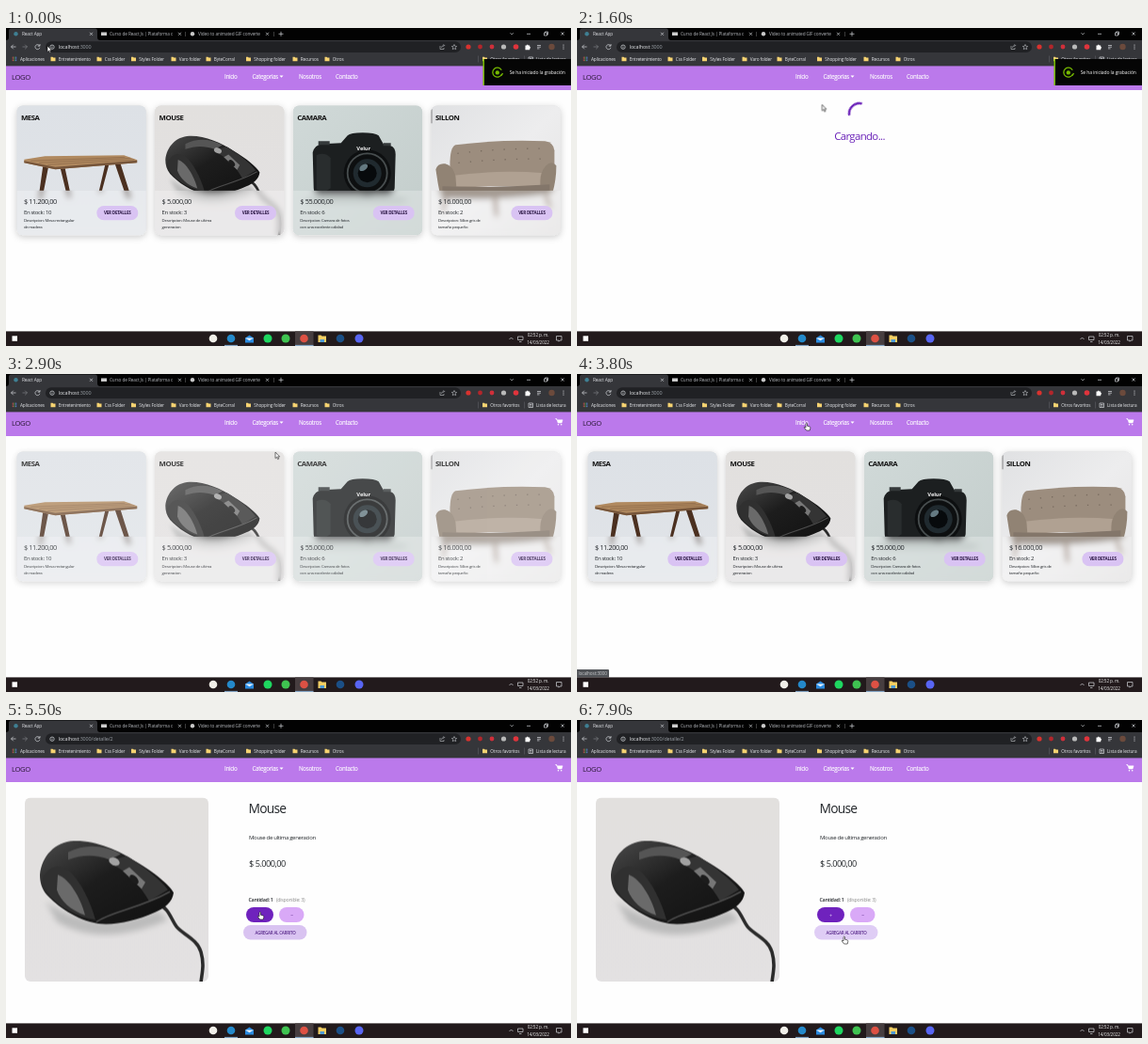
An HTML page that plays this animation: 600x338 px, repeating every 8 s.

```html
<!DOCTYPE html>
<html lang="es">
<head>
<meta charset="utf-8">
<title>Tienda</title>
<style>
html, body { margin: 0; width: 100%; height: 100%; overflow: hidden; background: #fff; }
svg { display: block; }
#stage { width: 100vw; height: 100vh; }
text { font-family: "Open Sans", "Noto Sans", sans-serif; letter-spacing: -.02em; white-space: pre; }
.page text { letter-spacing: -.055em; }
.mid { text-anchor: middle; }
.semi { font-weight: 600; }
.bold { font-weight: 700; }
.line { fill: none; stroke: #d5d7db; stroke-width: .7; }

/* One loop is 8 s, so 1% is 80 ms. */
.k { animation: 8s step-end infinite; }
#cards { animation-name: cards; }
#loading { animation-name: loading; }
#detail, #path { animation-name: detail; }
#photo { animation-name: photo; }
#spin { animation: spin 8s linear infinite; }
#notice { animation-name: notice; }
#cursor { animation: move 8s ease-in-out infinite; }
#arrow { animation-name: arrow; }
#hand { animation-name: hand; }
#beam { animation-name: beam; }
#home { animation-name: home; }
#link { animation-name: link; }
#one { animation-name: one; }
#two { animation-name: two; }
#three { animation-name: three; }
#minus { animation-name: minus; }
#add { animation-name: add; }

@keyframes cards {
  0% { opacity: 1; }
  2.5% { opacity: 0; }
  31.2% { opacity: .25; animation-timing-function: linear; }
  38% { opacity: 1; }
  58.7%, 100% { opacity: 0; }
}
@keyframes loading { 0% { opacity: 0; } 2.5% { opacity: 1; } 31.2%, 100% { opacity: 0; } }
@keyframes detail { 0% { opacity: 0; } 58.7%, 100% { opacity: 1; } }
@keyframes photo {
  0%, 58.7% { opacity: .4; animation-timing-function: linear; }
  67%, 100% { opacity: 1; }
}
@keyframes spin { to { transform: rotate(3840deg); } }
@keyframes notice {
  0% { transform: none; }
  24% { transform: none; animation-timing-function: ease-in; }
  27.5%, 100% { transform: translateX(100px); }
}
@keyframes move {
  0%, 1.2% { transform: translate(44px, 19px); }
  7.5%, 12% { transform: translate(79px, 45px); }
  23% { transform: translate(293px, 88px); }
  28.75%, 34% { transform: translate(297px, 91px); }
  41.25%, 47.5% { transform: translate(243px, 52px); }
  55% { transform: translate(265px, 194px); }
  58.75% { transform: translate(268px, 186px); }
  64%, 75.5% { transform: translate(269px, 204px); }
  80.5%, 91.25% { transform: translate(308px, 203px); }
  93.75%, 95.5% { transform: translate(288px, 223px); }
  98.75%, 100% { transform: translate(283px, 230px); }
}
@keyframes arrow {
  0% { opacity: 1; }
  40.5% { opacity: 0; }
  49% { opacity: 1; }
  53.7% { opacity: 0; }
  92.5% { opacity: 1; }
  95%, 100% { opacity: 0; }
}
@keyframes hand {
  0% { opacity: 0; }
  40.5% { opacity: 1; }
  49% { opacity: 0; }
  53.7% { opacity: 1; }
  58.7% { opacity: 0; }
  61% { opacity: 1; }
  92.5% { opacity: 0; }
  95%, 100% { opacity: 1; }
}
@keyframes beam { 0% { opacity: 0; } 58.7% { opacity: 1; } 61%, 100% { opacity: 0; } }
@keyframes home { 0% { opacity: 0; } 47.4% { opacity: 1; } 51%, 100% { opacity: 0; } }
@keyframes link { 0% { opacity: 0; } 55% { opacity: 1; } 62%, 100% { opacity: 0; } }
@keyframes one { 0% { opacity: 1; } 71% { opacity: 0; } 90.5%, 100% { opacity: 1; } }
@keyframes two { 0% { opacity: 0; } 71% { opacity: 1; } 75% { opacity: 0; } 86% { opacity: 1; } 90.5%, 100% { opacity: 0; } }
@keyframes three { 0% { opacity: 0; } 75% { opacity: 1; } 86%, 100% { opacity: 0; } }
@keyframes minus { 0% { fill: #d9a9f7; } 79% { fill: #dcb6f8; } 92.5%, 100% { fill: #d9a9f7; } }
@keyframes add { 0% { fill: #d9c3f1; } 96%, 100% { fill: #dfcdf5; } }
</style>
</head>
<body>
<svg id="stage" viewBox="0 0 600 338" preserveAspectRatio="none">
  <defs>
    <linearGradient id="grey" x2="0" y2="1"><stop stop-color="#e2e0de"/><stop offset="1" stop-color="#e3e1e2"/></linearGradient>
    <linearGradient id="pale" x2="0" y2="1"><stop stop-color="#dde1e6"/><stop offset="1" stop-color="#e1e4e8"/></linearGradient>
    <linearGradient id="mist" x2="1" y2="1"><stop stop-color="#d0d9d8"/><stop offset="1" stop-color="#c3cdcb"/></linearGradient>
    <linearGradient id="wall" x2="1" y2="1"><stop stop-color="#e0e1e3"/><stop offset=".5" stop-color="#ededee"/><stop offset="1" stop-color="#e3e2e2"/></linearGradient>
    <linearGradient id="gloss" x2="1" y2="1"><stop stop-color="#4a4a4a"/><stop offset=".45" stop-color="#1d1d1d"/><stop offset="1" stop-color="#111"/></linearGradient>
    <filter id="blur"><feGaussianBlur stdDeviation="3"/></filter>
    <filter id="soft" x="-20%" y="-20%" width="140%" height="140%"><feDropShadow dx="0" dy="2" stdDeviation="3.500" flood-opacity=".2"/></filter>
    <clipPath id="round"><rect width="137.5" height="138" rx="7"/></clipPath>
    <clipPath id="glass"><rect y="90.5" width="137.5" height="48"/></clipPath>
    <clipPath id="frame"><rect width="195" height="195.5" rx="6"/></clipPath>

    <g id="table">
      <rect width="138" height="138" fill="url(#pale)"/>
      <path d="M28 64h6l-7 36h-4zM46 65h5l7 33h-4zM104 61h6l12 38h-5zM94 63h4l-8 30h-3z" fill="#4b3020"/>
      <path d="M8 57.500l22-3.500 84-1 14 5-1 3-86 7-33-7z" fill="#b0895f"/>
      <path d="M15 59l100-4M24 61l97-5M33 63l92-5.500" stroke="#8b6748" stroke-width=".7" fill="none"/>
      <path d="M8 59l33 6.500 87-7v2.500l-87 7-33-7z" fill="#76553a"/>
    </g>

    <g id="mouse">
      <rect width="196" height="196" fill="url(#grey)"/>
      <path d="M22 110q50 36 120 10l10 10q-70 30-118 2z" fill="#bbb" filter="url(#blur)"/>
      <path d="M141 113c12 4 14 16 20 24s22 13 26 27 1 22 0 33" fill="none" stroke="#2b2b2b" stroke-width="3.600"/>
      <path d="M16 82C18 62 32 47 52 46C74 45 100 56 118 68C138 80 154 93 158 101C157 111 148 118 138 122C118 131 96 136 78 134C54 130 34 115 23 103C18 97 16 90 16 82Z" fill="url(#gloss)"/>
      <path d="M19 86c7-14 18-16 28-8s22 30 28 52c-20-3-38-14-48-25q-7-9-8-19z" fill="#303030"/>
      <path d="M35 82c12 4 24 24 29 43-15-5-26-15-30-27z" fill="#6a6a6a"/>
      <path d="M46 58c18-9 38-8 56 2l-12 6c-16-6-30-5-44 0z" fill="#555"/>
      <path d="M88 68l20-6c19 12 36 25 44 36l-20 12c-10-18-24-32-44-42z" fill="#343434"/>
      <path d="M104 78l7-4 17 16-4 7z" fill="#777"/>
      <ellipse cx="95" cy="68" rx="6" ry="4" transform="rotate(25 95 68)" fill="#a2a2a2"/>
      <ellipse cx="116" cy="87" rx="6" ry="3.500" transform="rotate(48 116 87)" fill="#1c1c1c"/>
      <path d="M76 132c18-12 46-14 78-32" fill="none" stroke="#4d4d4d" stroke-width="1.500"/>
    </g>

    <g id="camera">
      <rect width="138" height="138" fill="url(#mist)"/>
      <path d="M16 98h104v6H16z" fill="#a6b0ae" filter="url(#blur)"/>
      <path d="M21 50q2-8 10-9l20-1 7-8q3-3 16-3t17 3l5 9 8 2q5 2 5 9l-1 36q-1 8-9 8H30q-8 0-8-8z" fill="#1c1f20"/>
      <path d="M27 38h12v4H27zM96 40h8v3h-8z" fill="#34393a"/>
      <path d="M25 53q9-4 15 3v32q-7 6-15 1z" fill="#292d2e"/>
      <circle cx="79" cy="72" r="25" fill="#0d0f10"/>
      <circle cx="79" cy="72" r="21" fill="none" stroke="#474d4e" stroke-width="1.800"/>
      <circle cx="79" cy="72" r="15" fill="#202a2f"/>
      <circle cx="79" cy="72" r="10" fill="#070a0c"/>
      <ellipse cx="75" cy="66" rx="5" ry="3" transform="rotate(-35 75 66)" fill="#647981"/>
      <text x="75" y="47.800" class="mid bold" font-size="5.800" fill="#eee">Velur</text>
    </g>

    <g id="sofa">
      <rect width="138" height="138" fill="url(#wall)"/>
      <rect y="4" width="1" height="15" fill="#666"/>
      <path d="M13 98h4l-3 16h-2zM66 100h4l1 18h-3zM120 96h4l4 14h-2z" fill="#7a5638"/>
      <path d="M20 64q0-20 6-22 46-6 95-4 9 1 10 10v34l-108 6z" fill="#9c8d7e"/>
      <path d="M28 51q50-6 98-5M29 61q50-5 98-4" stroke="#776a5e" stroke-width="1.300" stroke-dasharray="1.300 11" fill="none"/>
      <path d="M20 75q48-7 100-3l6 14H18z" fill="#b0a192"/>
      <path d="M5 68q2-7 10-6 8 2 11 13l1 14-17 8q-3-14-5-29zM133 64q-5-6-11 0-6 7-6 16v13h13q4-14 4-29z" fill="#918374"/>
      <path d="M12 86q54 2 114-2v10q-58 8-114 5z" fill="#83766a"/>
    </g>

    <g id="folder"><path d="M0 .5h2l.8.8H5V5H0z" fill="#f5d271"/></g>
    <path id="close" d="M-1.500-1.500l3 3m0-3l-3 3"/>
  </defs>

  <rect width="600" height="338" fill="#fefefe"/>

  <g class="page">
    <g id="cards" class="k"></g>

    <g id="loading" class="k" fill="#6a21b8">
      <g transform="translate(300 91)"><path id="spin" d="M-6.600 8.800A11 11 0 0 1-6.900-8.500" fill="none" stroke="#6a21b8" stroke-width="2.400" stroke-linecap="round"/></g>
      <text x="300" y="119.300" class="mid" font-size="11.400">Cargando...</text>
    </g>

    <g id="detail" class="k" fill="#212529">
      <g id="photo" class="k"><g transform="translate(20 82.500)" clip-path="url(#frame)"><use href="#mouse"/></g></g>
      <text x="257.500" y="99" font-size="13.800">Mouse</text>
      <text x="258" y="127" font-size="6">Mouse de ultima generacion</text>
      <text x="258" y="156" font-size="9.200">$ 5.000,00</text>
      <g class="semi" font-size="5.400">
        <text id="one" class="k" x="257.500" y="193.300">Cantidad: 1</text>
        <text id="two" class="k" x="257.500" y="193.300">Cantidad: 2</text>
        <text id="three" class="k" x="257.500" y="193.300">Cantidad: 3</text>
      </g>
      <text x="287" y="193.300" font-size="5.300" fill="#8b8b8b">(disponible: 3)</text>
      <rect x="255" y="199" width="29" height="16" rx="8" fill="#6f22bd"/>
      <rect id="minus" class="k" x="290" y="199" width="26.500" height="16" rx="8" fill="#d9a9f7"/>
      <rect id="add" class="k" x="252" y="218" width="67.500" height="15.600" rx="7.800" fill="#d9c3f1"/>
      <g class="mid">
        <text x="269.500" y="209.800" font-size="5.500" fill="#e4d0f7">+</text>
        <text x="303.500" y="209.300" font-size="5.500" fill="#5b2a8c">–</text>
        <text x="286" y="227.500" class="semi" font-size="4.500" fill="#5a2a8c">AGREGAR AL CARRITO</text>
      </g>
    </g>

    <rect y="40" width="600" height="26" fill="#bb79eb"/>
    <text x="6" y="55.300" font-size="7.700" fill="#2c1a38">LOGO</text>
    <g id="nav" font-size="6.250" fill="#fff" stroke="#fff" stroke-width=".12"></g>
    <path d="M290.500 50.500h4l-2 2.200z" fill="#fff"/>
    <path d="M583.500 47.500h1.300l1.300 4.500h4l1-3.200h-6z" fill="#fff" stroke="#fff" stroke-width=".5"/>
    <circle cx="586.500" cy="53.700" r=".8" fill="#fff"/><circle cx="589.700" cy="53.700" r=".8" fill="#fff"/>
  </g>

  <g id="status" font-size="4.700" fill="#c8cacd">
    <g id="home" class="k"><path d="M0 314h33q1 0 1 1v7.500H0z" fill="#505357"/><text x="1.500" y="319.800">localhost:3000</text></g>
    <g id="link" class="k"><path d="M0 314h53q1.500 0 1.500 1.500v7H0z" fill="#3a3c40"/><text x="1.500" y="319.800">localhost:3000/detalle/2</text></g>
  </g>

  <g id="browser">
    <rect width="600" height="14" fill="#020202"/>
    <rect y="13" width="600" height="27.400" fill="#35363a"/>
    <path d="M0 13q3 0 3-3V3q0-2.500 2.500-2.500h89Q97 .5 97 3v7q0 3 3 3z" fill="#35363a"/>
    <rect x="42" y="14.300" width="441" height="11.800" rx="5.900" fill="#202124"/>
    <circle cx="10.500" cy="6.300" r="2.200" fill="#3f7f92"/>
    <rect x="101" y="4.500" width="6" height="3.500" fill="#ccc"/>
    <circle cx="198" cy="6.300" r="2.200" fill="#c8c8c8"/>
    <g font-size="4.700" fill="#dfe1e5">
      <text x="17" y="8.200">React App</text>
      <text x="110" y="8.200" fill="#b5b8bd">Curso de React Js | Plataforma c</text>
      <text x="204" y="8.200" fill="#b5b8bd">Video to animated GIF converte</text>
    </g>
    <text x="55.700" y="22.200" font-size="5.400" fill="#e8eaed">localhost<tspan fill="#9aa0a6">:3000</tspan><tspan id="path"></tspan></text>
    <g class="line">
      <use href="#close" x="90.500" y="6.300"/><use href="#close" x="184.500" y="6.300"/><use href="#close" x="277.500" y="6.300"/>
      <use href="#close" x="591" y="6"/>
      <path d="M190.500 4v5M284.500 4v5" stroke="#555"/>
      <path d="M289.500 6.300h5m-2.500-2.500v5M535.500 5.300l1.600 1.600 1.600-1.600M553 6.300h4M571.500 5h3v3h-3zM572.500 5V4h3v3h-1"/>
      <path d="M10.500 20H5.500m2.300-2.300L5.500 20l2.300 2.300"/>
      <path d="M17.500 20h5m-2.300-2.300l2.300 2.300-2.300 2.300" stroke="#7d8084"/>
      <path d="M35.700 19a2.500 2.500 0 1 0 .2 1.800M36 17v2.200h-2.200"/>
      <circle cx="49" cy="20.200" r="2.200"/><path d="M49 19.700v1.700m0-2.700v.5"/>
      <path d="M461 19v3.500h4V21m-2.500 0q0-2.500 3-2.500m-1-1.200l1.200 1.200-1.200 1.200" stroke="#a9acb0"/>
      <path d="M476 17.500l.8 1.800 1.900.2-1.400 1.300.4 1.900-1.700-1-1.700 1 .4-1.900-1.400-1.300 1.900-.2z" stroke="#a9acb0"/>
      <path d="M564 18.500h4m-4 1.700h4m-4 1.700h2.500"/>
      <path d="M501.500 29.500v7M550.500 29.500v7" stroke="#5f6165" stroke-width=".6"/>
      <path d="M555 31h4.500v4.500H555zM556 32.500h2.500M556 34h2.500"/>
    </g>
    <path d="M551.500 18.500h1.500q.8-2 1.600 0h1.600v1.500q2 .8 0 1.700v1.500h-4.700z" fill="#fff"/>
    <g id="extras"></g>
    <g id="marks" font-size="4.700" fill="#e8eaed"></g>
  </g>

  <g id="taskbar">
    <rect y="322.400" width="600" height="16" fill="#221a1c"/>
    <rect x="307" y="322.400" width="19.500" height="16" fill="#473e40"/>
    <path d="M232 337.400h14M307 337.400h19.500" stroke="#8fb4d8" stroke-width="1"/>
    <rect x="6.500" y="327.300" width="5.500" height="5.500" fill="#fff"/>
    <g id="apps"></g>
    <path d="M331.500 326.500h3l1 1h4.500v6.500h-8.500z" fill="#f3cf63"/><rect x="333.500" y="331" width="4.500" height="3" fill="#4d9bd6"/>
    <path d="M254 329.500l4.500-3 4.500 3v5h-9z" fill="#2b8be0"/><path d="M254 329.500l4.500 2.800 4.500-2.800z" fill="#e6f1fb"/>
    <path class="line" d="M534.500 331l2-2 2 2M543.500 328h5.500v3.500h-5.500zM545 333.500h2.500M584.500 327.500h5.500v4.500h-2l-1 1.200v-1.200h-2.500z"/>
    <g class="mid" font-size="4.600" fill="#eee"><text x="565" y="328.300">02:52 p. m.</text><text x="565" y="335.600">14/03/2022</text></g>
  </g>

  <g id="notice" class="k">
    <rect x="507" y="33" width="94" height="28" fill="#050505"/>
    <rect x="506.500" y="33" width="1.500" height="28" fill="#76b900"/>
    <path d="M526.200 44.700a5 5 0 1 0 .3 4.200M527.500 48l-1.300 2.500" fill="none" stroke="#76b900" stroke-width="1.300"/>
    <circle cx="521.800" cy="47.400" r="2.200" fill="#76b900"/>
    <text x="534.700" y="49.200" font-size="5" fill="#fff">Se ha iniciado la grabación</text>
  </g>

  <g id="cursor" fill="#fff" stroke="#111" stroke-width=".6" stroke-linejoin="round">
    <path id="arrow" class="k" d="M0 0v6.500l1.500-1.300 1.100 2.400 1-.5-1-2.300h2z"/>
    <path id="hand" class="k" d="M0 .6q.8-1.200 1.500 0v2.600l2.600.7q.9.4.7 1.500L4.200 8H.6L-1.700 5q-.2-1 .7-.8l1 .8z"/>
    <path id="beam" class="k" d="M-1.300-3h2.600M0-3v6M-1.300 3h2.600" fill="none"/>
  </g>
</svg>
<script>
const LOOP = 8000, DETAIL_AT = 4700;
const byId = id => document.getElementById(id);
const fill = (id, items, draw) => { byId(id).innerHTML = items.map(draw).join(""); };
const text = (x, y, size, str, more = "") => `<text x="${x}" y="${y}" font-size="${size}" ${more}>${str}</text>`;
const dot = ([x, y, r, color]) => `<circle cx="${x}" cy="${y}" r="${r}" fill="${color}"/>`;

const products = [
  ["table", "MESA", "11.200,00", 10, "Mesa rectangular", "de madera"],
  ["mouse", "MOUSE", "5.000,00", 3, "Mouse de ultima", "generacion"],
  ["camera", "CAMARA", "55.000,00", 6, "Camara de fotos", "con una excelente calidad"],
  ["sofa", "SILLON", "16.000,00", 2, "Sillon gris de", "tamaño pequeño"],
];

fill("cards", products, ([art, name, price, stock, about, rest], i) => {
  const scale = art === "mouse" ? 0.705 : 1;
  const picture = `<use href="#${art}" transform="scale(${scale})"/>`;
  return `<g transform="translate(${11.3 + i * 146.7} 82.3)" fill="#212529">
    <rect width="137.5" height="138" rx="7" fill="#e2e2e2" filter="url(#soft)"/>
    <g clip-path="url(#round)">${picture}
      <g clip-path="url(#glass)"><g filter="url(#blur)">${picture}</g>
      <rect y="90.5" width="138" height="48" fill="#fff" opacity=".25"/></g></g>
    ${text(4.6, 16.1, 7.8, name, 'class="bold" fill="#111"')}
    ${text(7.6, 104.5, 7.4, "$ " + price)}
    ${text(7.6, 115.4, 6, "En stock: " + stock)}
    ${text(7.6, 123.6, 4.3, "Descripcion: " + about)}
    ${text(7.6, 131, 4.3, rest)}
    <rect x="85" y="106.800" width="44" height="15.200" rx="7.600" fill="#d9c3f3"/>
    ${text(107, 116, 4.6, "VER DETALLES", 'class="mid bold" fill="#2b1745"')}
  </g>`;
});

fill("nav", [[232, "Inicio"], [261.5, "Categorias"], [311, "Nosotros"], [350, "Contacto"]],
  ([x, label]) => text(x, 53.6, 6.25, label));

const folders = [
  [47.5, "Entretenimiento"], [96.5, "Css Folder"], [133, "Styles Folder"], [175.5, "Varo folder"],
  [212.5, "ByteCorral"], [255, "Shopping folder"], [304.5, "Recursos"], [338.5, "Otros"], [506, "Otros favoritos"],
];
fill("marks", folders, ([x, label]) =>
  `<use href="#folder" x="${x}" y="30.300"/>` + text(x + 8.3, 34.7, 4.7, label));
byId("marks").innerHTML += text(15, 34.7, 4.7, "Aplicaciones") + text(563, 34.7, 4.7, "Lista de lectura");

const launcher = [..."012345678"].map(n => [7.3 + n % 3 * 1.7, 31.2 + Math.floor(n / 3) * 1.7, 0.6, ["#e2574c", "#57a55a", "#5b8def"][n % 3]]);
fill("extras", [
  [491, 20, 2.6, "#d9322e"], [503.5, 20, 2.4, "#b3262b"], [516, 20, 2.4, "#cf2f3a"], [528.5, 20, 2.6, "#b9b9b9"],
  [541.5, 20, 2.8, "#e0343c"], [579.5, 20, 3.2, "#6b4a3c"],
  [592, 18, 0.6, "#dfe1e5"], [592, 20, 0.6, "#dfe1e5"], [592, 22, 0.6, "#dfe1e5"], ...launcher,
], dot);

fill("apps", [
  [220, 330, 4.3, "#f0eee8"], [239, 330, 4.3, "#2489ca"], [278, 330, 4.5, "#1ed760"], [297, 330, 4.5, "#3fc351"],
  [316.5, 330, 4.3, "#dd5144"], [355, 330, 4.3, "#1b4f86"], [375, 330, 4.5, "#5865f2"],
], dot);

// The address gains its path together with the detail page.
const start = performance.now();
const path = byId("path");
path.setAttribute("fill", "#9aa0a6");
const showPath = () => {
  const onDetail = (performance.now() - start) % LOOP >= DETAIL_AT;
  path.textContent = onDetail ? "/detalle/2" : "";
  requestAnimationFrame(showPath);
};
showPath();
</script>
</body>
</html>
```
